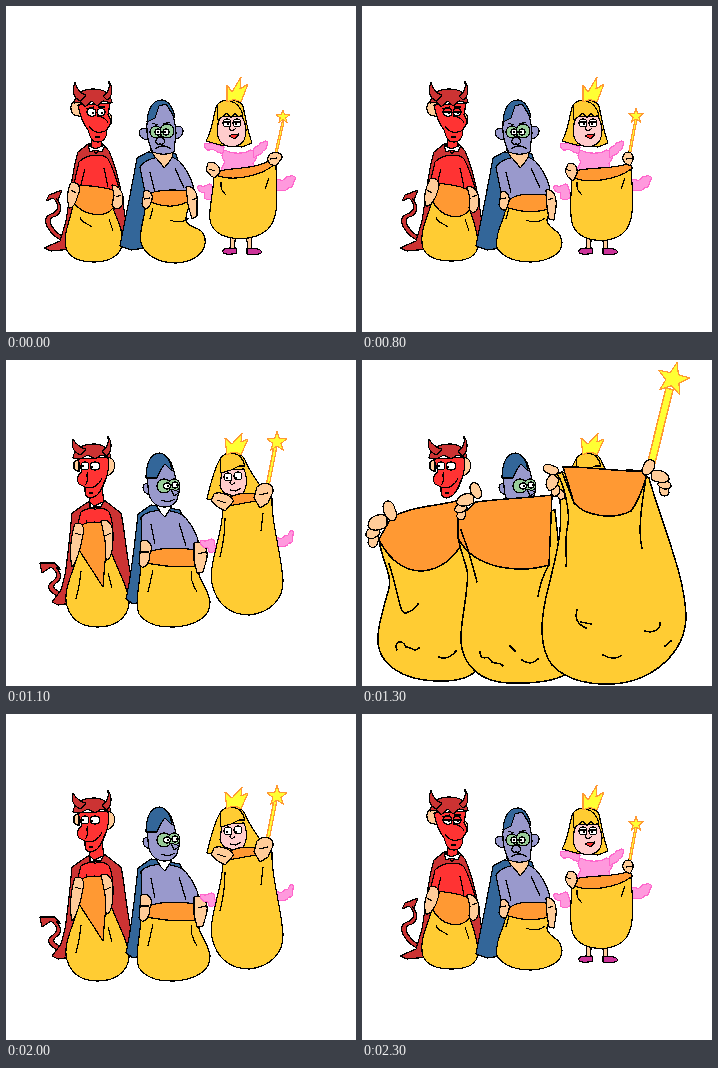
Recreate the animation shown at these times as an HTML page. Size 350 px wide and 326 px high, loop 2400 ms.

```html
<!DOCTYPE html>
<html lang="en">
<head>
<meta charset="utf-8">
<title>Trick or treat</title>
<style>
html, body { margin: 0; height: 100%; overflow: hidden; background: #fff; }
svg { display: block; width: 100vw; height: 100vh; shape-rendering: crispEdges; }
path, ellipse, circle { fill: none; stroke: #000; stroke-width: 1.2; stroke-linejoin: round; stroke-linecap: round; vector-effect: non-scaling-stroke; }
#big path, #big ellipse { stroke-width: 1.5; }
.bag { fill: #fc3; }
.lining { fill: #f93; }
.red { fill: #f33; }
.cape { fill: #c33; }
.lilac { fill: #99c; }
.blue { fill: #369; }
.green { fill: #9c9; }
.skin { fill: #fc9; }
.rosy { fill: #fcc; }
.white { fill: #fff; }
.pink { fill: #f9d; stroke: #f6c; }
.shoe { fill: #c39; }
.gold { fill: #ff3; stroke: #f93; }
.dot { fill: #000; stroke: none; }
</style>
</head>
<body>
<svg viewBox="0 0 350 326">
<defs>
  <path id="star" class="gold" d="M0 -10L2.5 -3.2L9.5 -3L4 1.5L6 8L0 4L-6 8L-4 1.5L-9.5 -3L-2.5 -3.2Z"/>
  <g id="hand">
    <path class="skin" d="M5 35C11 31 15 35 13 42C11 49 5 49 3 43Z"/>
    <path class="skin" d="M14 27C7 25 0 30 1 36C5 41 12 38 15 33Z"/>
    <path class="skin" d="M22 16C12 12 3 18 3 26C6 32 16 31 22 26Z"/>
    <path class="skin" d="M18 6C20 -2 28 0 30 9C34 17 30 22 25 20C20 17 18 12 18 6Z"/>
  </g>
</defs>

<!-- Devil -->
<g class="small">
  <path class="cape" d="M62 238C40 228 34 212 45 208C54 205 53 197 47 192L40 195L43 189L56 184L52 194L50 192C57 200 56 209 47 211C40 214 46 225 62 234Z"
    data-c="M62 240C42 234 38 226 47 221C53 216 51 212 45 207L36 213L34 203L49 203L55 210L50 207C56 214 56 219 50 223C44 227 50 232 62 234Z"/>
  <path class="cape" d="M82 138L72 146C66 165 64 190 60 215L54 235L38 242L45 245L66 243L112 240L122 242C120 212 115 172 103 145L97 138Z"
    data-c="M82 142L66 153C64 175 62 195 59 215L55 230L46 242L52 245L66 243L112 243L133 242C121 215 120 175 115 153L98 140Z"/>
  <path class="red" d="M73 156C80 148 97 147 102 153C108 164 112 178 114 186L104 192L66 186Z"
    data-c="M75 152C82 147 98 146 103 152C108 162 107 172 105 180L98 182L68 178Z"/>
  <path d="M79 163L75 179M98 162L102 181" data-c="M81 160L78 172M97 160L99 174"/>
  <path class="red" d="M86 130L85 140L90 148L96 140L95 130Z" data-c="M85 128L83 142L89 150L98 142L96 128Z"/>
  <path class="white" d="M82 139L89 143L99 139L96 146L89 144L84 146Z" data-c="M84 142L88 146L97 142L95 147L88 147L84 148Z"/>
</g>
<g id="devilFront">
  <path class="skin" d="M74 96C65 91 62 104 68 109L76 111ZM101 107C107 106 108 120 101 121Z"/>
  <path class="red" d="M72 99L104 97L102 109C106 114 105 119 101 123C101 129 99 136 92 136C84 136 84 129 82 124C77 118 74 109 72 99Z"/>
  <path class="cape" d="M68 97C70 87 77 83 87 83C98 83 105 88 106 97L97 95L91 100L86 95L79 101L75 96Z"/>
  <path class="cape" d="M75 95C66 92 66 84 69 76C71 84 75 88 80 89ZM97 90C103 87 104 82 103 75C108 83 106 91 101 94Z"/>
  <path class="white" d="M81 106C81 101 90 101 90 107C90 112 81 111 81 106ZM91 106C92 101 99 102 99 106C99 111 92 111 91 106Z"/>
  <circle class="dot" cx="87" cy="107" r="1.5"/><circle class="dot" cx="96" cy="107" r="1.5"/>
  <path id="lids" class="red" d="M81 106C81 101 90 101 90 106ZM91 106C92 101 99 101 99 106Z"/>
  <path d="M91 110C95 110 101 113 102 117M83 120C87 127 95 128 101 124M89 131L94 131M80 103L88 101M92 101L99 101"/>
</g>
<g id="devilSide">
  <path class="skin" d="M99 98C110 94 113 112 101 116ZM73 99L68 102L68 109L73 112Z"/>
  <path class="red" d="M72 99L102 97C103 107 102 114 100 119C97 129 91 138 84 138C78 137 79 131 79 127L73 124C70 120 71 115 76 112Z"/>
  <path class="cape" d="M67 98C68 88 78 84 88 84C98 84 104 90 105 98L95 95L89 99L82 95L74 99Z"/>
  <path class="cape" d="M75 95C67 92 65 86 67 79C71 86 75 88 80 89ZM96 91C102 88 103 83 102 76C108 85 104 95 100 96Z"/>
  <ellipse class="white" cx="79" cy="106" rx="4" ry="4"/><ellipse class="white" cx="89" cy="106" rx="5" ry="4"/>
  <circle class="dot" cx="77" cy="106" r="1.4"/><circle class="dot" cx="86" cy="107" r="1.4"/>
  <path d="M82 112C79 115 84 121 79 125M79 127C86 130 93 125 96 118M83 133L87 133M101 116L94 132"/>
</g>
<g class="small">
  <path class="lining" d="M65 179C80 179 96 181 108 184C112 196 110 205 102 209C88 211 74 207 67 197Z"
    data-b="M70 176C82 179 99 178 108 185C110 199 108 210 100 213C84 212 73 207 70 194Z"
    data-c="M75 165C84 161 94 162 100 164C102 186 99 208 97 227C84 227 77 215 73 190Z"/>
  <path class="bag" d="M67 196C67 210 56 226 60 242C64 254 78 256 88 256C104 256 115 249 116 238C118 224 110 212 107 202C100 212 78 211 67 196Z"
    data-b="M70 194C68 208 56 225 61 242C65 253 79 255 90 255C105 255 116 250 116 238C116 224 110 213 108 203C100 216 78 212 70 194Z"
    data-c="M73 190C69 209 56 230 61 246C66 263 80 267 92 267C109 267 122 258 123 243C122 222 105 202 101 176C100 194 98 211 97 227C83 228 77 211 73 190Z"/>
  <path d="M74 211C76 218 82 217 86 221M103 213L107 225" data-c="M75 211C74 225 72 230 70 239M102 213L106 228"/>
  <path class="skin" d="M65 177C72 175 76 181 72 189C70 196 67 203 63 202C61 195 61 183 65 177Z"
    data-b="M68 173C75 171 79 176 76 184C74 192 69 201 64 200C61 192 64 181 68 173Z"
    data-c="M69 164C75 161 79 166 77 175C75 188 70 203 66 207C63 195 65 174 69 164Z"/>
  <path class="skin" d="M106 179C113 179 118 187 117 195C116 204 110 205 106 199L108 189Z"
    data-b="M105 181C112 179 118 187 117 197C115 208 110 209 107 202L108 192Z"
    data-c="M95 161C103 158 108 166 107 178C107 192 104 201 100 200L99 180Z"/>
  <path d="M65 184L70 187M110 191L115 189" data-c="M69 173L75 175M99 176L105 173"/>
</g>

<!-- Masked villain -->
<g class="small">
  <path class="blue" d="M142 146L131 152C126 180 120 210 114 240L125 244L139 242L164 205L178 176L170 148Z"
    data-c="M145 145L132 154C129 180 126 212 120 239L127 244L148 238L170 205L188 180L174 150Z"/>
  <path class="lilac" d="M134 161C141 150 166 147 174 156C183 166 189 180 188 190L180 198L140 197L139 186Z"
    data-c="M135 157C144 148 170 148 180 158C188 168 194 180 194 192L180 202L139 200L136 184Z"/>
  <path d="M144 166L149 187M169 162L178 182" data-c="M145 164L149 184M173 163L180 186"/>
</g>
<g id="villainFront">
  <path class="skin" d="M144 142L167 145C168 151 163 157 158 162C154 154 147 152 144 142Z"/>
  <path class="lilac" d="M142 123C131 119 130 132 141 134ZM169 121C179 117 180 131 170 133Z"/>
  <path class="lilac" d="M141 126C140 110 145 95 155 94C165 95 169 113 170 127L168 146C162 149 153 149 147 146C143 140 142 134 141 126Z"/>
  <path class="blue" d="M141 116C142 101 148 94 156 94C163 95 167 101 169 112L160 98L153 100L149 112Z"/>
  <circle class="green" cx="150" cy="126" r="6"/><circle class="green" cx="161" cy="125" r="7"/>
  <ellipse class="white" cx="152" cy="126" rx="3" ry="3"/><ellipse class="white" cx="160" cy="126" rx="3" ry="3"/>
  <circle class="dot" cx="152" cy="126" r="1.2"/><circle class="dot" cx="159" cy="126" r="1.2"/>
  <path class="lilac" d="M152 131C148 136 150 139 154 138C159 139 160 135 156 131Z"/>
  <path d="M149 143C154 139 160 139 165 143M146 117L152 119M157 118L164 116"/>
</g>
<g id="villainSide">
  <path class="white" d="M150 145L166 146L159 157L155 153Z"/>
  <path class="lilac" d="M145 124C135 120 134 133 144 135Z"/>
  <path class="lilac" d="M142 126C139 110 144 96 154 94C165 94 168 111 170 120L174 128L171 140C166 148 156 149 149 144C144 140 142 135 142 126Z"/>
  <path class="blue" d="M140 118C140 101 146 93 154 93C161 94 165 102 166 111L159 104C155 108 153 114 151 118Z"/>
  <circle class="green" cx="158" cy="126" r="7"/><circle class="green" cx="168" cy="125" r="6"/>
  <ellipse class="white" cx="161" cy="126" rx="3.5" ry="3"/><ellipse class="white" cx="169" cy="125" rx="3" ry="3"/>
  <circle class="dot" cx="162" cy="126" r="1.2"/><circle class="dot" cx="171" cy="125" r="1.2"/>
  <path class="lilac" d="M165 129L174 132L168 136Z"/><path d="M155 140C160 142 165 142 169 139"/>
</g>
<g class="small">
  <path class="lining" d="M140 190C145 184 166 183 183 185L185 194C175 202 155 203 140 194Z"
    data-b="M144 202C145 188 162 187 184 189L188 202C177 207 160 207 144 202Z"
    data-c="M135 202C136 188 164 186 190 190L198 204C180 210 155 206 135 202Z"/>
  <path class="bag" d="M140 193C140 210 132 225 135 237C139 250 154 257 170 257C190 256 201 245 199 232C196 219 184 224 180 215C179 206 184 202 185 193C175 202 155 203 140 193Z"
    data-b="M144 201C143 213 132 228 135 242C141 252 155 256 169 256C188 255 201 247 200 236C198 222 188 225 185 215C184 210 190 209 188 202C177 207 160 207 144 201Z"
    data-c="M135 202C135 219 128 241 133 254C142 266 155 267 168 267C190 266 205 256 204 242C202 228 194 221 193 214C192 210 196 208 198 204C178 210 154 206 135 202Z"/>
  <path d="M147 202L144 213M164 214C171 217 178 216 183 212" data-c="M147 210L142 232M186 211C183 218 188 227 191 232"/>
  <path class="skin" d="M138 185C145 183 148 190 145 196C143 204 138 205 136 198Z"
    data-b="M139 186C146 184 149 192 146 198C145 206 140 206 137 199Z"
    data-c="M135 181C143 178 148 186 144 193C144 204 137 212 133 204C131 196 132 188 135 181Z"/>
  <path class="skin" d="M180 181C188 179 192 188 191 196L191 210L186 213L182 199Z"
    data-b="M184 184C192 182 195 192 194 201L192 214L187 213L185 201Z"
    data-c="M188 183C197 179 202 188 201 198L197 212L191 213L188 200Z"/>
  <path d="M138 193L144 192M186 194L191 192" data-c="M135 192L143 192M192 194L200 192"/>
</g>

<!-- Fairy -->
<g class="small">
  <path class="pink" d="M206 180C203 174 199 184 194 179C188 181 194 187 199 187C196 194 203 196 209 191ZM264 176C271 168 276 180 281 170C285 173 284 166 290 172C286 176 289 182 282 182C278 189 272 180 264 188Z"
    data-c="M208 180C204 176 201 184 196 180C191 183 197 188 202 188C202 193 206 194 210 190ZM264 178C269 172 274 184 279 175C284 179 282 166 288 172C285 176 289 184 283 183C278 191 272 182 264 190Z"/>
  <path class="pink" d="M221 145C216 142 214 152 219 155L215 164L220 168L248 166L247 157C253 152 250 144 244 144C240 148 226 148 221 145Z"
    data-c="M221 140C216 140 214 150 219 153L217 161L222 164L246 163L247 154C252 150 250 142 244 140C240 143 226 143 221 140Z"/>
  <path class="pink" d="M217 147C211 149 209 141 204 144C199 145 196 138 200 137C204 140 208 134 212 139L218 141ZM247 144C250 138 253 142 255 136C259 138 259 132 262 137C260 140 262 144 257 145C256 150 250 148 248 152Z"
    data-c="M217 147C214 148 213 141 214 144C213 145 214 138 215 137C215 140 216 134 217 139L218 141ZM247 144C248 138 249 142 250 138C251 139 252 138 253 139C253 140 254 143 252 144C252 148 250 148 248 150Z"/>
  <path class="skin" d="M225 228L224 243L228 243L230 228ZM240 228L242 243L246 243L245 228Z" data-c="M229 215L229 228L234 228L234 215ZM242 215L243 228L248 228L247 215Z"/>
  <path class="shoe" d="M230 242L218 243C214 247 220 250 231 247ZM241 242L252 243C260 246 254 250 241 248Z" data-c="M231 225L220 228C218 232 222 233 232 231ZM243 225L254 228C259 231 255 234 243 231Z"/>
  <path class="gold" d="M268 151L276 116L278 116L270 152Z" data-b="M266 150L273 113L275 113L268 151Z" data-c="M259 131L268 86L271 86L262 132Z"/>
  <use href="#star" transform="translate(277 111) scale(.68)" data-b="translate(274 110) scale(.75)" data-c="translate(271 82) scale(1.02)"/>
</g>
<g id="fairyFront">
  <path class="bag" d="M211 99C217 92 232 92 237 100C240 115 242 126 246 137L236 141L214 139L200 135C207 124 207 108 211 99Z"/>
  <path class="rosy" d="M214 111L236 110C239 116 242 126 238 134C233 143 219 142 214 135C210 129 211 118 214 111Z"/>
  <path class="bag" d="M211 99C217 92 232 92 237 109L232 111L229 107L225 112L221 107L212 114Z"/>
  <path class="gold" d="M221 96L221 79L226 86L235 71L234 83L242 78L235 96C231 93 225 93 221 96Z"/>
  <ellipse class="white" cx="221" cy="117" rx="4" ry="4"/><ellipse class="white" cx="231" cy="117" rx="4" ry="4"/>
  <path d="M217 116L225 116M227 116L235 116M225 119C221 125 227 126 230 122"/>
  <circle class="dot" cx="222" cy="118" r="1.4"/><circle class="dot" cx="230" cy="118" r="1.4"/>
  <path class="red" d="M223 130L227 128L229 129L233 128L229 133Z"/>
</g>
<g id="fairySide">
  <path class="bag" d="M214 99C220 90 234 90 239 100C243 111 249 117 255 127L265 137L263 151L227 148L217 142L201 139C204 127 207 111 214 99Z"/>
  <path class="rosy" d="M216 110L238 109C242 119 241 130 235 135C228 137 216 135 214 126Z"/>
  <path class="bag" d="M214 99C220 90 235 90 239 106L233 106L225 110L215 113Z"/>
  <path class="gold" d="M221 95L219 78L226 84L236 73L235 82L242 79L235 95C231 91 225 92 221 95Z"/>
  <ellipse class="white" cx="222" cy="117" rx="4" ry="4"/><ellipse class="white" cx="232" cy="116" rx="4" ry="4"/>
  <circle class="dot" cx="221" cy="118" r="1.4"/><circle class="dot" cx="230" cy="118" r="1.4"/>
  <path d="M226 120C221 124 227 126 229 122M224 130L230 131L235 128"/>
</g>
<g class="small">
  <path class="lining" d="M209 166C225 161 249 164 264 154C273 154 270 163 262 166C244 174 221 174 209 170Z"
    data-b="M210 166C225 160 249 164 265 158C273 159 271 166 263 169C244 176 221 178 210 172Z"
    data-c="M218 147C222 133 239 131 253 135C254 147 249 159 247 170C235 170 225 163 218 149Z"/>
  <path class="bag" d="M208 168C208 187 200 211 206 220C215 236 247 236 261 224C275 212 270 185 270 157C257 170 225 177 208 168Z"
    data-b="M210 171C209 189 207 208 211 220C219 237 247 238 260 228C274 218 271 190 269 163C257 173 226 179 210 171Z"
    data-c="M217 147C217 175 202 203 206 224C211 246 226 255 243 255C265 253 278 238 277 220C275 191 265 163 266 138L252 140C251 151 249 160 247 170C235 170 223 162 217 147Z"/>
  <path d="M215 176C214 183 217 186 220 189M263 172L259 183" data-c="M219 158C219 178 216 188 214 197M257 153C255 171 259 181 262 190"/>
  <path class="skin" d="M202 157C208 154 214 160 214 166L209 172L205 170L200 164Z"
    data-b="M206 158C212 155 216 161 215 168L211 175L206 171L203 165Z"
    data-c="M208 134C216 130 229 138 227 142L219 151L212 147L205 141Z"/>
  <path class="skin" d="M264 148C270 145 277 147 276 152L270 160L264 158L261 153Z"
    data-b="M263 147C269 144 272 149 271 154L268 160L263 157L260 152Z"
    data-c="M251 127C258 120 268 124 267 132L262 143L254 148L248 138Z"/>
  <path d="M203 163L209 165M264 153L271 152" data-c="M211 140L220 143M253 135L262 133"/>
</g>

<!-- Bags held up close -->
<g id="big">
  <g data-shift="-4 -4">
    <path class="bag" d="M17 180C21 205 30 214 27 228C21 250 15 268 16 283C18 303 38 320 74 321C98 322 112 316 118 306L112 220L99 180L94 150L30 160Z"/>
    <path class="lining" d="M17 179L29 158C48 146 76 146 94 141L103 160L100 183C85 213 42 228 17 180Z"/>
    <path d="M27 204C38 236 37 258 46 252C51 251 53 248 56 244M35 290C31 282 40 278 44 287C50 287 52 293 57 288M77 297C84 300 89 297 94 291"/>
  </g>
  <g data-shift="0 0"><use href="#hand" transform="translate(3 140)"/></g>
  <g data-shift="-4 1">
    <path class="bag" d="M96 178C101 202 108 209 105 225C103 250 98 265 99 282C101 307 120 322 146 323C175 324 199 320 210 310L193 150L110 160Z"/>
    <path class="lining" d="M96 158L114 142C136 139 165 138 190 135L187 205C160 213 113 211 96 178Z"/>
    <path d="M99 170C110 198 112 212 115 222M187 205C181 215 178 224 176 236M118 292C119 304 126 292 130 302C134 305 138 301 141 306M148 286L153 291M160 300C167 305 172 303 176 299"/>
    <use href="#hand" transform="translate(92 122) scale(.88 .8)"/>
  </g>
  <g data-shift="-1 -3">
    <path class="gold" d="M285 105L304 28L311 30L292 107Z"/>
    <use href="#star" transform="translate(311 19) rotate(14) scale(1.7)"/>
  </g>
  <g data-shift="-10 -1">
    <path class="bag" d="M193 113C206 160 194 195 187 225C178 258 177 288 190 305C206 322 232 325 250 324C291 322 324 292 324 256C323 215 300 165 287 118L270 110Z"/>
    <path class="lining" d="M201 107C226 106 253 112 281 111L284 118C280 131 276 142 269 151C249 161 222 155 212 143C209 132 205 120 201 107Z"/>
    <path d="M195 114C202 123 208 152 206 164C201 187 206 198 204 206M200 112L212 143M284 118C279 148 276 172 280 188M215 250C212 260 217 265 224 268M219 262L229 264M283 271C292 274 299 268 298 263M303 286L309 281M241 295C248 299 254 299 259 296"/>
  </g>
  <g data-shift="-2 3">
    <use href="#hand" transform="translate(170 119) rotate(-50) scale(.78)"/>
    <use href="#hand" transform="translate(310 99) scale(-.95 .78)"/>
  </g>
</g>
</svg>
<script>
const $ = id => document.getElementById(id);
const all = selector => [...document.querySelectorAll(selector)];
const show = (el, on) => { el.style.display = on ? '' : 'none'; };
const NUMBER = /-?\d*\.?\d+/g;

// Blend two strings that differ only in their numbers.
function mix(a, b, t) {
  const ends = b.match(NUMBER);
  let i = 0;
  return a.replace(NUMBER, v => +v + (ends[i++] - v) * t);
}

const morphs = all('[data-c]').map(el => {
  const attr = el.hasAttribute('d') ? 'd' : 'transform';
  const start = el.getAttribute(attr);
  return { el, attr, keys: [start, el.dataset.b || start, el.dataset.c] };
});
const shifts = all('[data-shift]').map(el => [el, ...el.dataset.shift.split(' ')]);
const small = all('.small');

function render(step) {
  const close = step >= 12 && step < 20;
  const pose = step < 8 ? 0 : step < 12 ? 1 + (step - 8) / 3 : close ? 2 : 2 - (step - 20) / 3;
  const side = pose > 1.5;
  const from = Math.min(1, Math.floor(pose));

  for (const { el, attr, keys } of morphs)
    el.setAttribute(attr, mix(keys[from], keys[from + 1], pose - from));
  small.forEach(el => show(el, !close));
  show($('big'), close);
  for (const name of ['devil', 'villain', 'fairy']) {
    show($(name + 'Front'), !side);
    show($(name + 'Side'), side);
  }
  show($('lids'), step > 0);

  const settle = Math.max(0, Math.min(1, (step - 13) / 2));
  for (const [el, x, y] of shifts)
    el.setAttribute('transform', `translate(${x * settle} ${y * settle})`);
  $('big').setAttribute('transform', step === 12 ? 'translate(-15 -16) scale(1.12)' : '');
}

let last = -1;
function tick() {
  const step = Math.floor(performance.now() % 2400 / 100);
  if (step !== last) render(last = step);
  requestAnimationFrame(tick);
}
tick();
</script>
</body>
</html>
```
